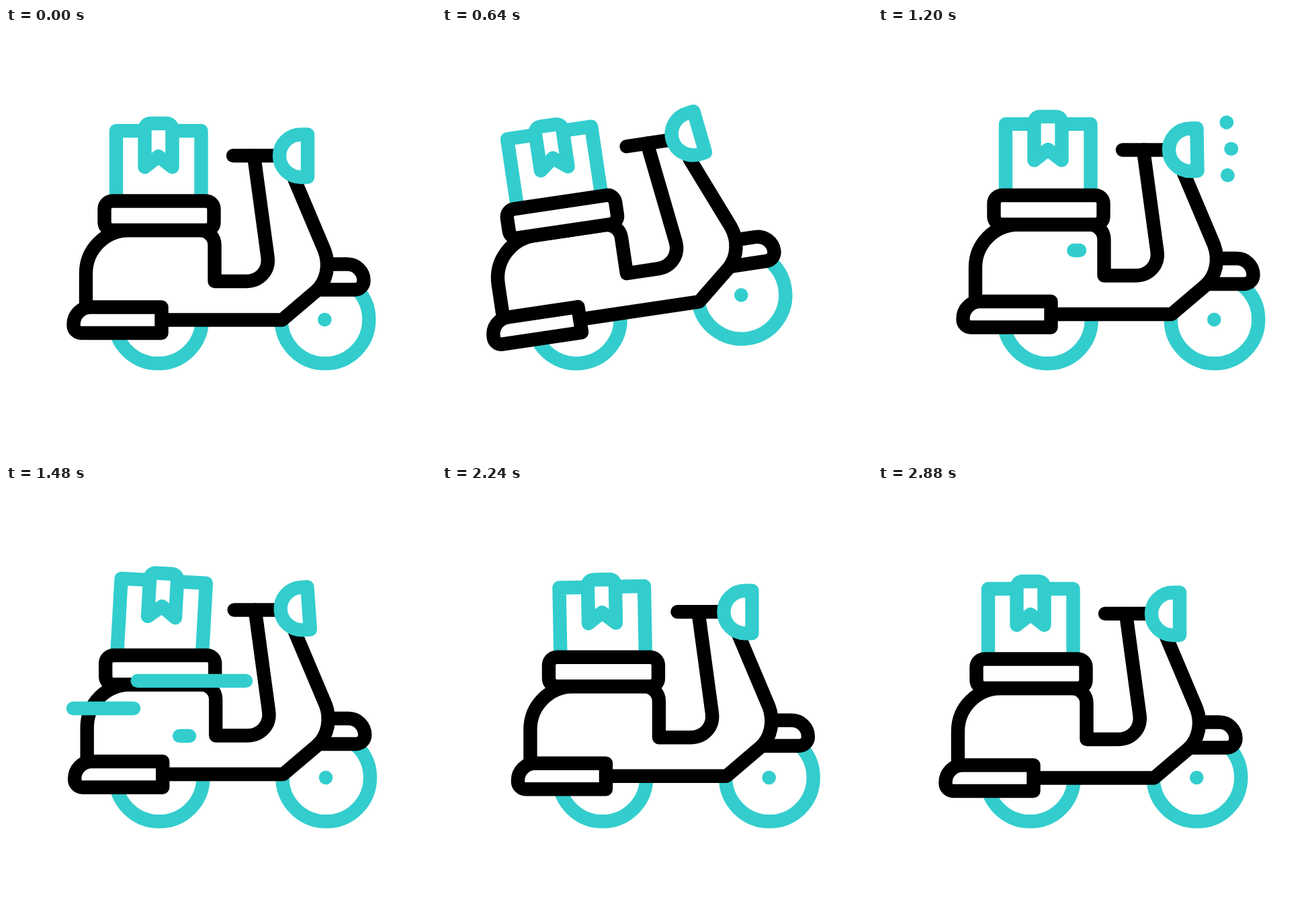
An HTML page with a canvas for the animation above (3000 ms loop, 640 by 640 pixels).

```html
<!DOCTYPE html>
<html lang="en">
<head>
<meta charset="utf-8">
<title>Delivery scooter</title>
<style>
  html, body { margin: 0; width: 100%; height: 100%; overflow: hidden; background: #fff; }
  canvas { display: block; width: 640px; height: 640px; }
</style>
</head>
<body>
<canvas id="stage" width="640" height="640"></canvas>
<script>
const ctx = document.getElementById('stage').getContext('2d');
const LOOP = 3000, STEP = 40;
const TEAL = '#33cdcd', BLACK = '#000';
const REAR = [226.5, 434], FRONT = [475, 434];
const LAMP_PIVOT = [407, 190], BOX_PIVOT = [227.5, 257];

const shape = {
  box: new Path2D('M164 258V153H290.5V258'),
  label: new Path2D('M206.5 207V152Q206.5 142 216.5 142H237.5Q247.5 142 247.5 152V207L227 191Z'),
  seat: new Path2D('M158.5 257.5H297.5A12 12 0 0 1 309.5 269.5V289A12 12 0 0 1 297.5 301H158.5A12 12 0 0 1 146.5 289V269.5A12 12 0 0 1 158.5 257.5Z'),
  hull: new Path2D('M119 412V365A64 64 0 0 1 183 301H288.5A22 22 0 0 1 310.5 323V377H357C378 377 392 361 389.5 341L369 190L428 222L474 331C482 352 478 377 461 392L411 434.5H119Z'),
  frame: new Path2D('M119 412V365A64 64 0 0 1 183 301H288.5A22 22 0 0 1 310.5 323V377H357C378 377 392 361 389.5 341L369 190M428 222L474 331C482 352 478 377 461 392L411 434.5H232'),
  bar: new Path2D('M338 190H407'),
  board: new Path2D('M231.5 415.5V454H112A11.5 11.5 0 0 1 100.5 442.5V441A25.5 25.5 0 0 1 126 415.5Z'),
  fender: new Path2D('M480 351.5H508A24.5 24.5 0 0 1 532.5 376A13.5 13.5 0 0 1 519 389.5H467'),
  lamp: new Path2D('M449 158.5H439A32 31.75 0 0 0 439 222H449Z')
};

// Key poses as [time, value]
const keys = {
  drive: [[0, 0], [640, -26.3], [1200, 26], [1680, -13], [2200, 12.6], [2800, 0]],
  tilt: [[0, 0], [600, -8.46], [680, -8.46], [1200, 0]],
  bob: [[1040, 0], [1320, -14], [1600, 0], [1880, -14], [2160, 0], [2440, -14], [2720, 0]],
  lamp: [[0, 0], [640, -7.7], [960, 0], [1120, 0], [1400, -5], [1680, 0], [1960, -5], [2240, 0], [2520, -5], [2800, 0]],
  hop: [[1120, 0], [1400, -8.1], [1680, 0], [1960, -8.1], [2240, 0], [2520, -5], [2800, 0]],
  sway: [[1200, 0], [1480, 3.2], [2320, -1.2], [2880, 0]]
};

// Light rays: start point and angle
const rays = [[474, 160, -26], [478, 190, 0], [474, 220, 25]];

// Wind lines: height, from, to, then head and tail time spans
const winds = [
  { y: 290, from: 357, to: 121, head: [1280, 1600], tail: [1480, 1800] },
  { y: 331, from: 300, to: 100, head: [1160, 1480], tail: [1240, 1690] },
  { y: 372, from: 273, to: 73, head: [1400, 1880], tail: [1520, 2040] }
];

function ease(t, a, b) {
  const p = Math.min(1, Math.max(0, (t - a) / (b - a)));
  return p * p * (3 - 2 * p);
}

function sample(list, t) {
  let v = list[0][1];
  for (let i = 1; i < list.length; i++) {
    const [t0, v0] = list[i - 1], [t1, v1] = list[i];
    if (t >= t0) v = v0 + (v1 - v0) * ease(t, t0, t1);
  }
  return v;
}

function rotate([x, y], deg) {
  ctx.translate(x, y);
  ctx.rotate(deg * Math.PI / 180);
  ctx.translate(-x, -y);
}

function outline(path, color, filled) {
  if (filled) {
    ctx.fillStyle = '#fff';
    ctx.fill(path);
  }
  ctx.strokeStyle = color;
  ctx.stroke(path);
}

function segment(x0, y0, x1, y1) {
  ctx.beginPath();
  ctx.moveTo(x0, y0);
  ctx.lineTo(x1, y1);
  ctx.strokeStyle = TEAL;
  ctx.stroke();
}

function wheel([x, y]) {
  ctx.beginPath();
  ctx.arc(x, y, 65.3, 0, Math.PI * 2);
  ctx.strokeStyle = TEAL;
  ctx.stroke();
}

function drawWheels() {
  wheel(REAR);
  wheel(FRONT);
  ctx.beginPath();
  ctx.arc(474.3, 434, 10.3, 0, Math.PI * 2);
  ctx.fillStyle = TEAL;
  ctx.fill();
}

function drawBox(t) {
  ctx.save();
  ctx.translate(0, sample(keys.hop, t));
  rotate(BOX_PIVOT, sample(keys.sway, t));
  outline(shape.box, TEAL);
  outline(shape.label, TEAL, true);
  ctx.restore();
}

function drawBody() {
  outline(shape.fender, BLACK, true);
  ctx.fillStyle = '#fff';
  ctx.fill(shape.hull);
  outline(shape.frame, BLACK);
  outline(shape.seat, BLACK, true);
  outline(shape.board, BLACK, true);
  outline(shape.bar, BLACK);
}

function drawLamp(t) {
  ctx.save();
  rotate(LAMP_PIVOT, sample(keys.lamp, t));
  outline(shape.lamp, TEAL, true);
  const head = 22 * ease(t, 880, 1100), tail = 22 * ease(t, 1000, 1220);
  if (head - tail > 0.1) {
    for (const [x, y, deg] of rays) {
      const c = Math.cos(deg * Math.PI / 180), s = Math.sin(deg * Math.PI / 180);
      segment(x + c * tail, y + s * tail, x + c * head, y + s * head);
    }
  }
  ctx.restore();
}

function drawWind(t) {
  for (const w of winds) {
    const span = w.to - w.from;
    const head = w.from + span * ease(t, ...w.head);
    const tail = w.from + span * ease(t, ...w.tail);
    if (tail - head > 0.1) segment(tail, w.y, head, w.y);
  }
}

function draw(t) {
  ctx.fillStyle = '#fff';
  ctx.fillRect(0, 0, 640, 640);
  ctx.lineWidth = 20.4;
  ctx.lineCap = ctx.lineJoin = 'round';
  ctx.save();
  ctx.translate(sample(keys.drive, t), 0);
  rotate(REAR, sample(keys.tilt, t));
  drawWheels();
  ctx.translate(0, sample(keys.bob, t));
  drawBox(t);
  drawBody();
  drawLamp(t);
  ctx.restore();
  drawWind(t);
}

const start = performance.now();
function tick() {
  const t = (performance.now() - start) % LOOP;
  draw(Math.floor(t / STEP) * STEP);
  requestAnimationFrame(tick);
}
tick();
</script>
</body>
</html>
```
